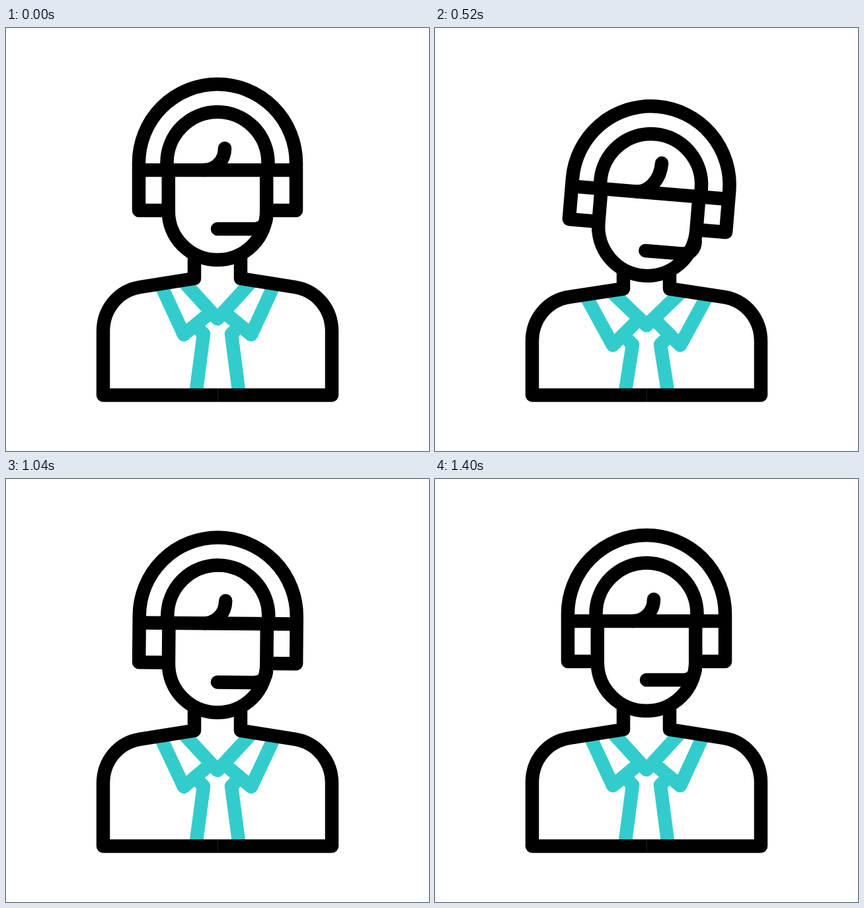
Recreate the animation shown at these times as an HTML page with a canvas. Size 640x640 px, loop 1480 ms.

```html
<!DOCTYPE html>
<html lang="en">
<head>
<meta charset="utf-8">
<title>Support agent</title>
<style>
  html, body { margin: 0; width: 100%; height: 100%; overflow: hidden; background: #fff; }
  canvas { display: block; width: 100%; height: 100%; object-fit: contain; }
</style>
</head>
<body>
<canvas id="stage" width="640" height="640"></canvas>
<script>
const ctx = document.getElementById('stage').getContext('2d');
const LOOP = 1480, STEP = 40, CX = 320, TEAL = '#33cccc';

// Heights of the parts, the leaning x positions and the head tilt in each pose.
const REST = {
  tilt: 0, top: 85, archTop: 127, arc: 204, band: 215, ear: 276, mic: 304, chin: 350.8,
  tuftX: 331, tuftY: 182,
  base: 555.4, sideX: 147, sideY: 459, shoulderX: 203, shoulderY: 392, neck: 379,
  veeX: 268, veeTop: 383, vee: 440, flapX: 234, flapTop: 388, flap: 464, knot: 463
};
const JUMP = {
  tilt: 0, top: 46, archTop: 85.2, arc: 159, band: 169.8, ear: 227.6, mic: 241, chin: 299,
  tuftX: 335.5, tuftY: 132,
  base: 517, sideX: 154.5, sideY: 415, shoulderX: 211.5, shoulderY: 351, neck: 332.5,
  veeX: 262, veeTop: 338, vee: 390, flapX: 231, flapTop: 346, flap: 414, knot: 413
};
const SQUASH = {
  tilt: 4.75, top: 118, archTop: 160, arc: 237, band: 249, ear: 299, mic: 337, chin: 374.8,
  tuftX: 333.7, tuftY: 203,
  base: 555.6, sideX: 147, sideY: 474, shoulderX: 203, shoulderY: 407, neck: 394.5,
  veeX: 265, veeTop: 397, vee: 450, flapX: 227.5, flapTop: 404, flap: 480, knot: 479
};

const KEYS = [
  [0, REST], [120, REST], [320, JUMP], [520, SQUASH], [800, REST],
  [1000, REST], [1200, SQUASH], [1400, REST], [LOOP, REST]
];

function poseAt(time) {
  const i = KEYS.findIndex(([end]) => time < end);
  const [start, from] = KEYS[i - 1], [end, to] = KEYS[i];
  const x = (time - start) / (end - start), eased = x * x * (3 - 2 * x);
  const pose = {};
  for (const key in from) pose[key] = from[key] + (to[key] - from[key]) * eased;
  return pose;
}

function line(...points) {
  ctx.beginPath();
  points.forEach(([x, y]) => ctx.lineTo(x, y));
  ctx.stroke();
}

function collar(p) {
  line([p.veeX, p.veeTop], [CX, p.vee], [2 * CX - p.veeX, p.veeTop]);
  mirrored(() => {
    line([p.flapX, p.flapTop], [269, p.flap], [304, p.vee - 5]);
    line([290, p.knot - 9], [299, p.knot], [287, p.base]);
  });
}

function torsoHalf(p) {
  const dx = p.shoulderX - 285, dy = p.shoulderY - p.neck;
  ctx.beginPath();
  ctx.moveTo(CX, p.base);
  ctx.lineTo(147, p.base);
  ctx.lineTo(p.sideX, p.sideY);
  ctx.bezierCurveTo(p.sideX, p.sideY - 34,
    p.shoulderX + dx * 0.4, p.shoulderY + dy * 0.4, p.shoulderX, p.shoulderY);
  ctx.lineTo(285, p.neck);
  ctx.lineTo(285, p.chin - 12);
  ctx.stroke();
}

function head(p) {
  const jaw = p.ear + 1.3, pivot = p.ear + 18;
  ctx.save();
  ctx.translate(CX, pivot);
  ctx.rotate(p.tilt * Math.PI / 180);
  ctx.translate(-CX, -pivot);

  // Headband with the ear cups
  ctx.beginPath();
  ctx.moveTo(246, p.ear);
  ctx.lineTo(201, p.ear);
  ctx.lineTo(201, p.arc);
  ctx.ellipse(CX, p.arc, 119, p.arc - p.top, 0, Math.PI, 2 * Math.PI);
  ctx.lineTo(439, p.ear);
  ctx.lineTo(394, p.ear);
  ctx.stroke();
  line([201, p.band], [439, p.band]);

  // Hair
  ctx.beginPath();
  ctx.moveTo(243.5, p.band);
  ctx.ellipse(CX, p.arc, 76.5, p.arc - p.archTop, 0, Math.PI, 2 * Math.PI);
  ctx.lineTo(396.5, p.band);
  ctx.stroke();

  // Face
  ctx.beginPath();
  ctx.moveTo(394.2, p.band);
  ctx.ellipse(CX, jaw, 74.2, p.chin - jaw, 0, 0, Math.PI);
  ctx.lineTo(245.8, p.band);
  ctx.stroke();

  // Microphone and tuft
  ctx.lineCap = 'round';
  ctx.beginPath();
  ctx.moveTo(CX, p.mic);
  ctx.lineTo(374, p.mic);
  ctx.quadraticCurveTo(394, p.mic, 394, p.mic - 20);
  ctx.stroke();
  const drop = p.band - p.tuftY;
  ctx.beginPath();
  ctx.moveTo(p.tuftX, p.tuftY);
  ctx.bezierCurveTo(p.tuftX, p.tuftY + drop * 0.55, 318, p.band - 1, 300, p.band);
  ctx.stroke();
  ctx.restore();
}

function mirrored(drawHalf) {
  drawHalf();
  ctx.save();
  ctx.translate(2 * CX, 0);
  ctx.scale(-1, 1);
  drawHalf();
  ctx.restore();
}

function draw(p) {
  ctx.fillStyle = '#fff';
  ctx.fillRect(0, 0, 640, 640);
  ctx.lineWidth = 20.5;
  ctx.lineJoin = 'round';
  ctx.lineCap = 'butt';
  ctx.strokeStyle = TEAL;
  collar(p);
  ctx.strokeStyle = '#000';
  mirrored(() => torsoHalf(p));
  head(p);
  // Hairline seam between the two torso halves
  ctx.fillStyle = 'rgba(255, 255, 255, .12)';
  ctx.fillRect(CX, p.base - 10, 1, 20);
}

const begin = performance.now();
function tick() {
  const time = (performance.now() - begin) % LOOP;
  draw(poseAt(Math.floor(time / STEP) * STEP));
  requestAnimationFrame(tick);
}
tick();
</script>
</body>
</html>
```
